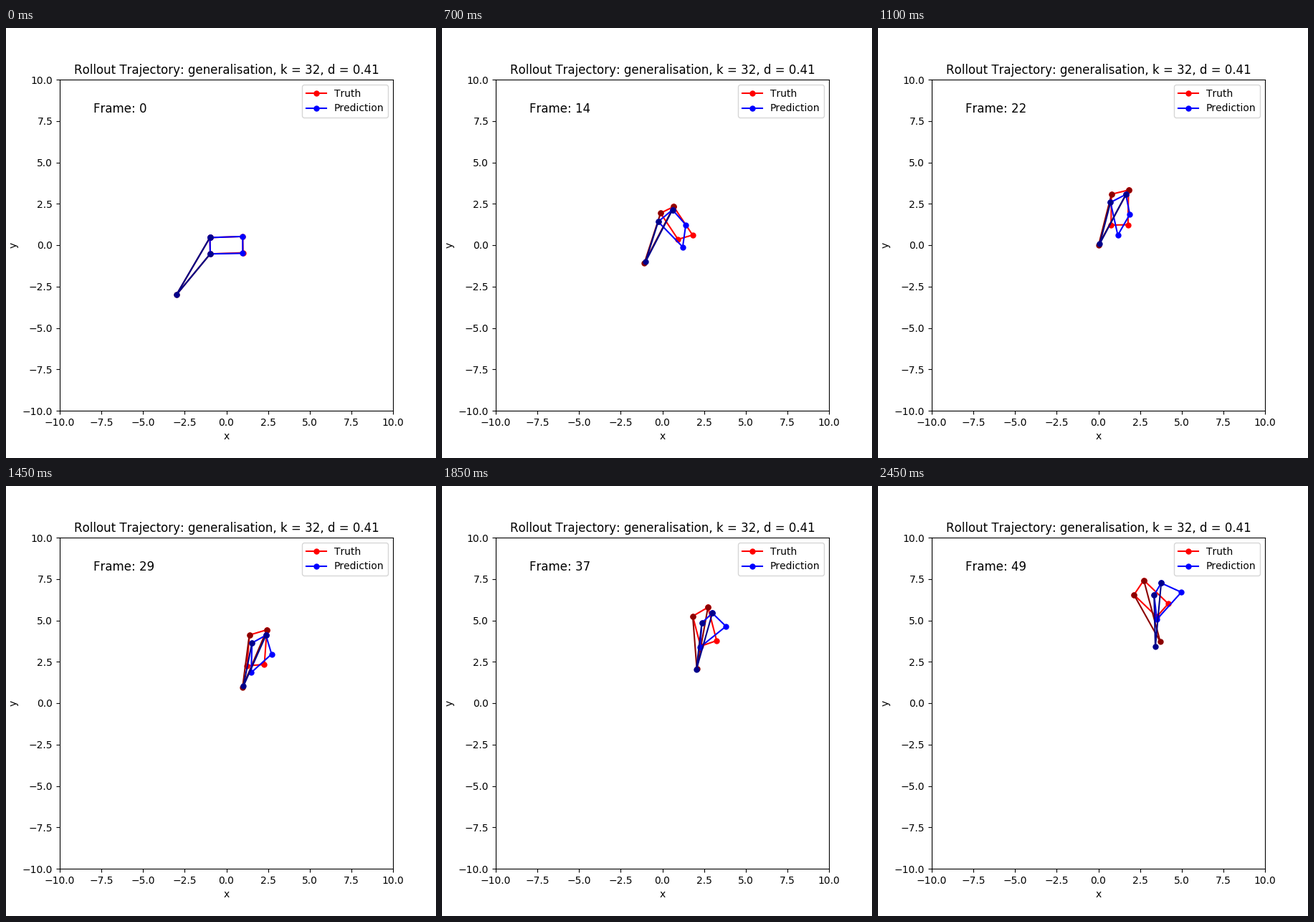
Write a matplotlib script that moves like this. It is 600 by 600 pixels and loops after 2.5 s.

```python
import numpy as np
import matplotlib.pyplot as plt
from matplotlib.animation import FuncAnimation

FRAMES = 50
INTERVAL = 50

# Wider letter spacing, as in older matplotlib releases.
plt.rcParams["text.kerning_factor"] = 6


def ease(*keys):
    """Smooth curve through keys spread evenly over the loop."""
    keys = np.array(keys, float)
    slope = np.gradient(keys)
    u = np.linspace(0, len(keys) - 1, FRAMES)
    k = np.minimum(u.astype(int), len(keys) - 2)
    s = u - k
    return (keys[k] + (keys[k + 1] - keys[k]) * s**2 * (3 - 2 * s)
            + slope[k] * s * (1 - s)**2 - slope[k + 1] * s**2 * (1 - s))


def rod(length, degrees):
    """Vector of a rod as complex numbers, one per step."""
    return length * np.exp(1j * np.radians(degrees))


def linkage(tail, top_arm, low_arm, top_side, low_side):
    """Node paths: two arms swing about the tail, a side hangs on each."""
    tail = tail * (1 + 1j)
    top, low = tail + top_arm, tail + low_arm
    return np.stack([top, low, low + low_side, top + top_side, tail], axis=1)


swing = ease(2, -49, -96, -76, -44)
truth = linkage(
    tail=ease(-3, 3.713),
    top_arm=rod(ease(4.0, 3.755, 3.84), ease(59.8, 62.7, 62.6, 79.4, 104.9)),
    low_arm=rod(ease(3.2, 3.16, 3.24), ease(50.6, 70.5, 77.7, 94, 119.1)),
    top_side=rod(ease(1.97, 2.1, 2.04), swing),
    low_side=rod(ease(1.97, 1.86, 1.9), swing),
)
prediction = linkage(
    tail=ease(-3, -1.26, 0.42, 2.01, 3.42),
    top_arm=rod(ease(4.0, 3.345, 3.85), ease(59.8, 62.7, 63, 74, 84.8)),
    low_arm=rod(ease(3.2, 2.58, 2.61, 2.82, 3.11),
                ease(50.6, 71, 76.5, 83.2, 91.4)),
    top_side=rod(ease(1.97, 1.25, 1.23, 1.14, 1.33),
                 ease(2, -42, -82, -45, -24.6)),
    low_side=rod(ease(1.95, 2.12, 1.97, 1.47, 1.48),
                 ease(1, -39.5, -84.5, -94, -83.6)),
)

fig, ax = plt.subplots(figsize=(6, 6), dpi=100)
ax.set(xlim=(-10, 10), ylim=(-10, 10), xlabel="x", ylabel="y")
ax.set_title("Rollout Trajectory: generalisation, k = 32, d = 0.41")
counter = ax.text(-8, 8, "", fontsize=12)

BOX = [0, 1, 2, 3, 0]
ARMS = [0, 4, 1]


def make_lines(color, dark, label):
    box, = ax.plot([], [], "o-", color=color, ms=5, label=label)
    arms, = ax.plot([], [], "o-", color=dark, ms=5)
    return box, arms


bodies = [
    (truth, make_lines("red", "darkred", "Truth")),
    (prediction, make_lines("blue", "darkblue", "Prediction")),
]
ax.legend(loc="upper right")


def draw(i):
    counter.set_text(f"Frame: {i}")
    for nodes, lines in bodies:
        for line, order in zip(lines, (BOX, ARMS)):
            path = nodes[i, order]
            line.set_data(path.real, path.imag)
    return [counter] + [line for _, lines in bodies for line in lines]


anim = FuncAnimation(fig, draw, frames=FRAMES, interval=INTERVAL,
                     repeat=True, repeat_delay=0)
plt.show()
```
